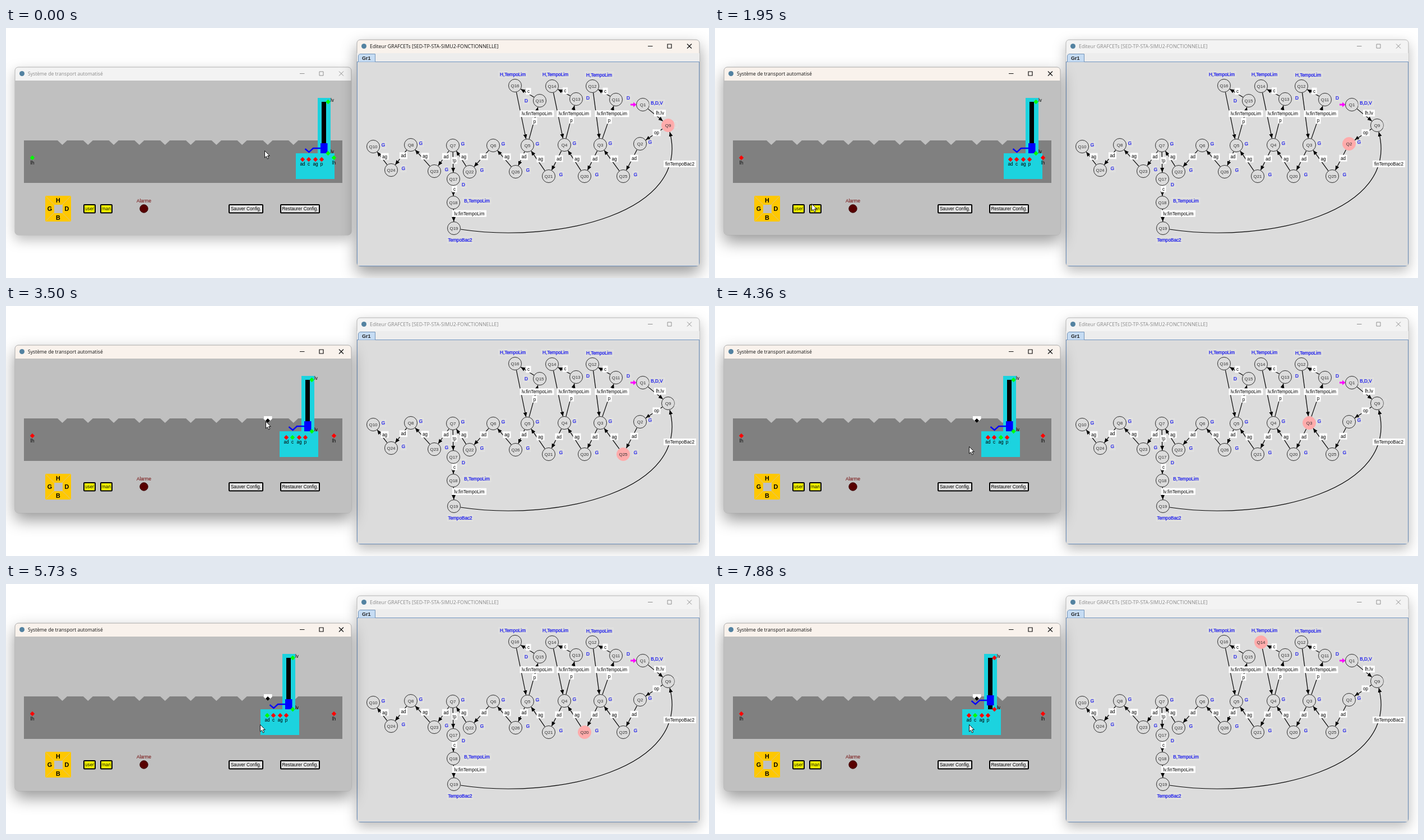
An HTML page that plays this animation: 1254x447 px, repeating every 8 s.

```html
<!DOCTYPE html>
<html lang="fr">
<head>
<meta charset="utf-8">
<title>Système de transport automatisé</title>
<style>
html, body { margin: 0; width: 100%; height: 100%; overflow: hidden; background: #fff; }
svg { display: block; font: 8.2px "Liberation Sans", Arial, sans-serif; }
text { dominant-baseline: alphabetic; }
.mid { text-anchor: middle; }
.bold { font-weight: bold; }
.title { font-family: "Open Sans", "Noto Sans", sans-serif; fill: #8a8a8a; }
.bar { fill: #f3f3f3; stroke: #b4b4b4; filter: drop-shadow(0 8px 11px #0004); }
.controls { fill: none; stroke: #8f8f8f; }
.active .title { fill: #111; }
.active .bar { fill: #f9f2ec; stroke: #aaa; filter: drop-shadow(0 12px 14px #0006); }
.active .controls { stroke: #111; stroke-width: 1.2; }
.edge { fill: none; stroke: #000; stroke-width: 1.2; }
.action { fill: #1010f0; stroke: #1010f0; stroke-width: .22; }
.node circle { fill: #dcdcdc; stroke: #2c2c2c; }
.node text { fill: #333; }
.node.on circle { fill: #ffabab; stroke: #ffabab; }
.button { stroke: #000; stroke-width: 2; }
</style>
</head>
<body>
<svg id="stage" width="1254" height="447" viewBox="0 0 1254 447"></svg>
<script>
const LOOP = 8000, SPEED = 0.0157, HOME = 517;
const FIRST_SLOT = 100.5, SLOT_PITCH = 45.8;
const stage = document.getElementById('stage');

const rect = (x, y, w, h, fill, extra = '') =>
  `<rect x="${x}" y="${y}" width="${w}" height="${h}" fill="${fill}" ${extra}/>`;
const text = (x, y, label, cls = 'mid', extra = '') =>
  `<text x="${x}" y="${y}" class="${cls}" ${extra}>${label}</text>`;
const diamond = (x, y, id) =>
  `<path class="${id}" fill="#f00" d="M${x - 4.2} ${y}l4.2-4.2 4.2 4.2-4.2 4.2z"/>`;

function windowFrame(id, x, y, w, h, title, size, content) {
  const cy = y + 11.5, r = x + w;
  return `<g id="${id}">
    <clipPath id="${id}Clip"><rect x="${x}" y="${y}" width="${w}" height="${h}" rx="6"/></clipPath>
    <rect class="bar" x="${x}" y="${y}" width="${w}" height="${h}" rx="6"/>
    <g clip-path="url(#${id}Clip)">${content}</g>
    <circle cx="${x + 12.5}" cy="${cy}" r="4.5" fill="#5382a1"/>
    ${text(x + 23, y + 15, title, 'title', `font-size="${size}"`)}
    <path class="controls" d="M${r - 92} ${cy}h8.5M${r - 57} ${cy - 3.5}h7v7h-7z
      M${r - 22} ${cy - 4}l8 8m0-8l-8 8"/>
  </g>`;
}

function plant() {
  const slots = Array.from({ length: 10 }, (_, i) =>
    `<path fill="#c0c0c0" d="M${FIRST_SLOT + i * SLOT_PITCH - 8.5} 201h17l-8.5 8z"/>`).join('');
  const button = (x, w, label, fill) =>
    rect(x, 316, w, 14.5, fill, 'class="button" rx="1"') + text(x + w / 2, 326, label);
  const pad = [['H', 93, 312], ['G', 78, 327], ['D', 108.5, 327], ['B', 93, 342.5]]
    .map(([c, x, y]) => text(x, y, c, 'mid bold', 'font-size="10.8"')).join('');
  const sensors = [['ad', 12], ['c', 23], ['ag', 35], ['p', 46]]
    .map(([name, x]) => diamond(x, 235, name) + text(x, 245.5, name)).join('');
  const limits = [47, 585].map(x => diamond(x, 232, 'lh') + text(x, 244, 'lh')).join('');
  const cart = rect(0, 224, 69, 46, '#1cd3df') + rect(39, 125, 23, 99, '#1cd3df')
    + rect(46, 132, 8, 92, '#000')
    + `<g id="arm">${rect(44, 206, 12.5, 18, '#00f')}
      <path fill="none" stroke="#00f" stroke-width="2.4" d="M45 215H31L23.5 222 16.5 216"/></g>`
    + [132, 224].map(y => diamond(57.5, y, 'lv') + text(62, y, 'lv', '')).join('') + sensors;
  return rect(16, 94, 600, 276, '#c0c0c0') + rect(32, 201, 568, 76, '#808080') + slots
    + `<g id="tray"><path fill="#fff" d="M460 197h14.5v5l-7.5 7-7-7z"/>
       <path d="M463 205l4-4 4 4-4 4z"/></g>`
    + `<g id="cart">${cart}</g>` + limits
    + rect(70, 300, 46, 46, '#ffc800')
    + '<path stroke="#ddc480" d="M70 300l46 46M116 300l-46 46"/>'
    + rect(86, 316, 15, 15, '#c0c0c0') + pad
    + button(139, 20, 'user', '#ff0') + button(169, 20, 'man', '#ff0')
    + text(246, 312, 'Alarme', 'mid', 'fill="#700000"')
    + '<circle cx="246" cy="323" r="7.2" fill="#580000" stroke="#380000"/>'
    + button(398, 60, 'Sauver Config.', '#e4e4e4') + button(490, 69, 'Restaurer Config.', '#e4e4e4');
}

// Step, centre, then action and its centre; a bare line means action G beside the step.
const STEPS = `Q16 908 103 H,TempoLim 904 83
Q15 952 130 D 928 130
Q14 974 104 H,TempoLim 980 83
Q13 1017 127 D 1038 125
Q12 1046 104 H,TempoLim 1058 84
Q11 1088 128 D 1110 125
Q1 1136 137 B,D,V 1161 134
Q9 1181 174 - 0 0
Q17 798 270 D 816 280
Q18 798 312 B,TempoLim 840 309
Q19 799 358 TempoBac2 810 379
Q2 1131 207
Q25 1101 265
Q3 1060 209
Q20 1032 265
Q4 996 209
Q21 968 265
Q5 930 210
Q26 909 257
Q6 869 210
Q22 827 257
Q7 797 210
Q23 764 256
Q8 722 209
Q24 687 254
Q10 655 212`.split('\n').map(line => {
  const [name, x, y, action = 'G', ax, ay] = line.split(' ');
  return { name, x: +x, y: +y, action,
    ax: ax ? +ax : +x + (y > 240 ? 22 : 18), ay: ay ? +ay : y - 2.5 };
});

const ZIGZAG = 'Q2 Q25 Q3 Q20 Q4 Q21 Q5 Q26 Q6 Q22 Q7 Q23 Q8 Q24 Q10'.split(' ');
const LIFTS = [['Q3', 'Q11', 'Q12'], ['Q4', 'Q13', 'Q14'], ['Q5', 'Q15', 'Q16']];
const LINKS = [
  ['Q1', 'Q9', 'lh.lv'], ['Q9', 'Q2', 'op'],
  ...ZIGZAG.slice(1).map((to, i) => [ZIGZAG[i], to, i % 2 ? 'ag' : 'ad']),
  ...LIFTS.flatMap(([low, side, top]) =>
    [[low, side, 'p'], [side, top, 'c'], [top, low, 'lv.finTempoLim']]),
  ['Q7', 'Q17', '!p'], ['Q17', 'Q18', 'c'], ['Q18', 'Q19', 'lv.finTempoLim']
];

function grafcet() {
  const byName = Object.fromEntries(STEPS.map(s => [s.name, s]));
  const tag = (x, y, label, w) =>
    rect(x - 2, y - 6, w + 4, 12, '#fff') + text(x + w / 2, y + 2.8, label);
  const widths = { 'lv.finTempoLim': 57, 'lh.lv': 17, c: 5, p: 5, '!p': 6 };
  let lines = '', tags = '';
  for (const [from, to, label] of LINKS) {
    const a = byName[from], b = byName[to];
    const d = Math.hypot(b.x - a.x, b.y - a.y);
    const ux = (b.x - a.x) / d * 12, uy = (b.y - a.y) / d * 12;
    lines += `<path class="edge" marker-end="url(#head)"
      d="M${a.x + ux} ${a.y + uy}L${b.x - ux} ${b.y - uy}"/>`;
    tags += tag((a.x + b.x) / 2 - .5, (a.y + b.y) / 2 - 3.3, label, widths[label] || 10);
  }
  lines += '<path class="edge" marker-end="url(#head)" d="M811 360C985 386 1222 330 1184 186"/>';
  tags += tag(1175, 243, 'finTempoBac2', 54);
  const nodes = STEPS.map(s => `<g class="node" id="${s.name}">
      <circle cx="${s.x}" cy="${s.y}" r="11.5"/>${text(s.x, s.y + 3, s.name, 'mid', 'font-size="8"')}</g>`
    + (s.action === '-' ? '' : actionLabel(s))).join('');
  return rect(626, 45, 611, 16, '#ededed')
    + rect(626.5, 60.5, 610, 365, '#dcdcdc', 'stroke="#6f93c0"')
    + '<path fill="#c6dcf3" stroke="#7394b8" d="M628.5 60.5V49l3-2.5h27v14"/>'
    + text(635, 56.5, 'Gr1', 'bold', 'font-size="9" fill="#222"')
    + lines + tags + nodes
    + rect(1192, 167, 5, 11, 'none', 'stroke="#e6e6e6" stroke-width=".7"')
    + '<path fill="#f0f" d="M1114 135.5h5v-3l5.5 4.5-5.5 4.5v-3h-5z"/>';
}

function actionLabel({ action, ax, ay }) {
  const w = action.length * 4.5 + 5;
  return rect(ax - w / 2, ay - 5.5, w, 11, 'none', 'stroke="#e8e8e8" stroke-width=".7"')
    + text(ax, ay + 2.8, action, 'mid action');
}

stage.innerHTML = `<defs><marker id="head" markerUnits="userSpaceOnUse" markerWidth="9"
    markerHeight="8" refX="8" refY="3.5" orient="auto"><path d="M0 0L8 3.5 0 7z"/></marker></defs>`
  + windowFrame('plant', 16, 70, 600, 300, 'Système de transport automatisé', 8.63, plant())
  + windowFrame('editor', 626, 21, 611, 405,
    'Editeur GRAFCETs [SED-TP-STA-SIMU2-FONCTIONNELLE]', 8.8, grafcet())
  + `<path id="cursor" fill="#fff" stroke="#000" stroke-width=".9" stroke-linejoin="round"
      d="M.5 .5V13L3.4 10.3 5.5 15 7.6 14 5.5 9.5H9.3z"/>`;

const $ = id => document.getElementById(id);
const windows = [$('plant'), $('editor')];

// Screen refreshes come in bursts: first, last, count.
const BURSTS = [[120, 660, 5], [1090, 1240, 2], [1670, 2700, 8], [2820, 3770, 8],
  [3900, 4900, 8], [5020, 5970, 8], [6120, 7040, 8], [7190, 7880, 6]];
const refreshes = [0, ...BURSTS.flatMap(([a, b, n]) =>
  Array.from({ length: n }, (_, i) => a + (b - a) * i / (n - 1)))];
const snap = t => refreshes.findLast(r => r <= t + .01);

const ACTIVE = [[0, 'Q9'], [1670, 'Q2'], [2330, 'Q25'], [3890, 'Q3'], [5260, 'Q20'],
  [6800, 'Q4'], [7000, 'Q13'], [7400, 'Q14']];
const POINTER = [[0, 461, 219], [660, 139, 325], [1000, 139, 325], [1240, 142, 325],
  [1670, 142, 325], [2450, 464, 203], [3400, 464, 203], [4050, 453, 251], [LOOP, 453, 251]];

function pointerAt(t) {
  const i = POINTER.findIndex(p => p[0] > t);
  const [t0, x0, y0] = POINTER[i - 1], [t1, x1, y1] = POINTER[i];
  const k = (t - t0) / (t1 - t0), e = k * k * (3 - 2 * k);
  return [Math.round(x0 + (x1 - x0) * e), Math.round(y0 + (y1 - y0) * e)];
}

function cartAt(t) {
  if (t < 1670) return HOME;
  if (t < 7000) return Math.round(HOME - SPEED * (t - 1670));
  return Math.min(441, Math.round(435 + SPEED * Math.max(0, t - 7060)));
}

function light(name, on) {
  for (const el of stage.getElementsByClassName(name)) el.setAttribute('fill', on ? '#0f0' : '#f00');
}

function draw(time) {
  const t = snap(time), x = cartAt(t);
  const lift = Math.round(Math.max(0, t - 7440) * SPEED);
  const hook = x + 22;
  const slot = Math.min(9, Math.round((hook - FIRST_SLOT) / SLOT_PITCH));
  const gap = hook - FIRST_SLOT - slot * SLOT_PITCH;
  const trayShown = t >= 3000;

  $('cart').setAttribute('transform', `translate(${x})`);
  $('arm').setAttribute('transform', `translate(0 ${-lift})`);
  $('tray').setAttribute('visibility', trayShown ? 'visible' : 'hidden');
  $('cursor').setAttribute('transform', `translate(${pointerAt(t)})`);

  light('ad', gap >= 8 && gap <= 16);
  light('c', Math.abs(gap) <= 4);
  light('ag', gap <= -8 && gap >= -16);
  light('p', trayShown && slot === 8 && gap <= -8 && gap >= -16);
  light('lv', lift === 0);
  light('lh', x === HOME);

  const step = ACTIVE.findLast(s => s[0] <= t)[1];
  for (const s of STEPS) $(s.name).classList.toggle('on', s.name === step);

  const front = windows[t < 1670 ? 1 : 0];
  for (const w of windows) w.classList.toggle('active', w === front);
  if ($('cursor').previousElementSibling !== front) stage.insertBefore(front, $('cursor'));
}

const start = performance.now();
function tick() {
  draw((performance.now() - start) % LOOP);
  requestAnimationFrame(tick);
}
tick();
</script>
</body>
</html>
```
